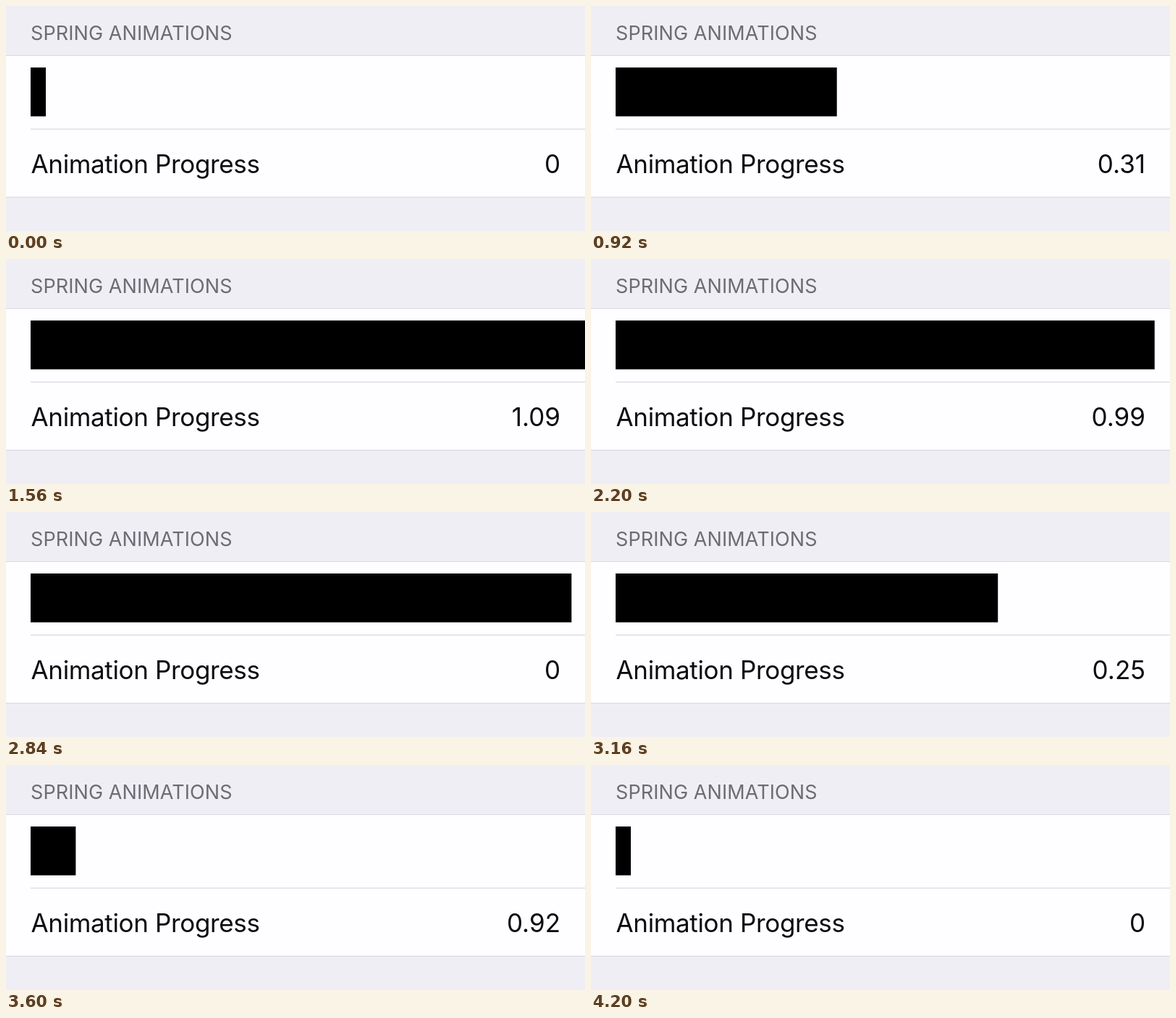
An HTML page that plays this animation: 800x311 px, repeating every 4.36 s.

```html
<!DOCTYPE html>
<html lang="en">
<head>
<meta charset="utf-8">
<title>Spring animations</title>
<style>
  html, body { margin: 0; width: 100%; height: 100%; overflow: hidden; background: #f0eef5; }
  svg { display: block; width: 100%; height: 100%; }
  text { font-family: Inter, "Open Sans", sans-serif; font-size: 35px; letter-spacing: -0.35px; fill: #0c0c0e; }
  .header { font-size: 27px; letter-spacing: 0.08px; fill: #6d6c72; }
  .value { letter-spacing: 0; }
  .line { fill: #d9d7e0; }
</style>
</head>
<body>
<svg viewBox="0 0 800 311">
  <text class="header" x="34" y="47">SPRING ANIMATIONS</text>
  <rect y="68" width="800" height="196.5" fill="#fefdff"/>
  <rect class="line" y="68" width="800" height="1"/>
  <rect class="line" x="34" y="169.5" width="766" height="1.2"/>
  <rect class="line" y="263.7" width="800" height="1.2"/>
  <rect id="bar" x="34" y="85" width="21" height="67.5"/>
  <text x="34.5" y="231">Animation Progress</text>
  <text id="value" class="value" x="766" y="231" text-anchor="end">0</text>
</svg>
<script>
  const LOOP = 4360, STEP = 40;
  const SPRING_START = 718.5, SPRING_SHOWN = 800;
  const RESET = 2600, EASE_START = 2784, EASE_TIME = 980, CLEAR = 4160;
  const NARROW = 21, TRAVEL = 731;
  const bar = document.getElementById('bar');
  const value = document.getElementById('value');

  // Underdamped spring from 0 to 1, released at rest.
  function spring(ms) {
    if (ms <= 0) return 0;
    const t = ms / 1000, w = Math.PI / 0.69, decay = 0.712 * w;
    return 1 - Math.exp(-decay * t) * (Math.cos(w * t) + 0.712 * Math.sin(w * t));
  }

  // cubic-bezier(.42, 0, .58, 1)
  function easeInOut(x) {
    if (x <= 0) return 0;
    if (x >= 1) return 1;
    let low = 0, high = 1;
    for (let i = 0; i < 24; i++) {
      const s = (low + high) / 2, r = 1 - s;
      if (1.26 * s * r * r + 1.74 * s * s * r + s ** 3 < x) low = s;
      else high = s;
    }
    return low * low * (3 - 2 * low);
  }

  const forward = t => spring(t - SPRING_START);
  const back = t => easeInOut((t - EASE_START) / EASE_TIME);

  function barProgress(t) {
    if (t < SPRING_SHOWN) return 0;
    return t < RESET ? forward(t) : 1 - back(t);
  }

  // The label trails the bar slightly.
  function labelProgress(t) {
    if (t < SPRING_SHOWN || t >= CLEAR) return 0;
    return t < RESET ? forward(t - 28) : back(t - 34);
  }

  function draw() {
    const t = Math.floor(performance.now() % LOOP / STEP) * STEP;
    bar.setAttribute('width', NARROW + TRAVEL * barProgress(t));
    value.textContent = Number(labelProgress(t).toFixed(2));
    requestAnimationFrame(draw);
  }
  draw();
</script>
</body>
</html>
```
